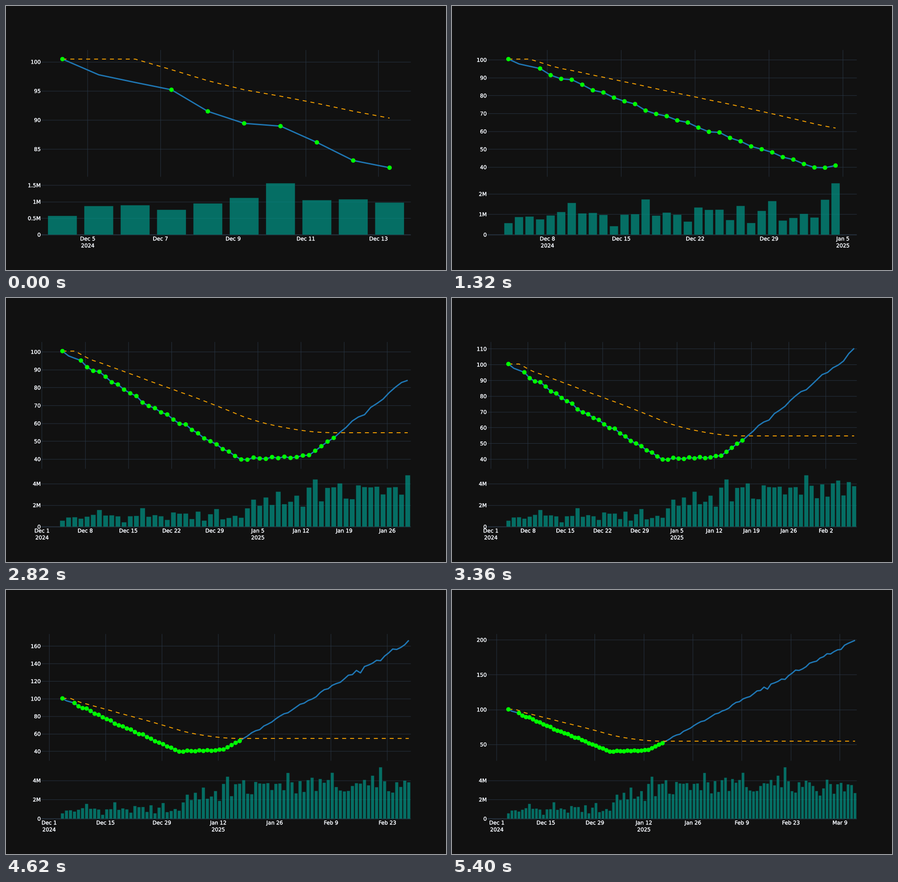
Recreate the animation shown at these times as a matplotlib script. Size 966x580 px, loop 5460 ms.

```python
import math

import numpy as np
import matplotlib.pyplot as plt
from matplotlib.animation import FuncAnimation
from matplotlib.collections import LineCollection, PolyCollection
from matplotlib.patheffects import withStroke

plt.rcParams["font.family"] = "DejaVu Sans"
plt.rcParams["text.hinting"] = "none"

# Three market phases: decline, sideways, growth
PHASE_DAYS = [30, 10, 60]
FIRST, DAYS = 10, sum(PHASE_DAYS)

# Layout on a 1000 x 600 drawing grid
LEFT, RIGHT, TOP, BOTTOM = 80, 920, 100, 520
PRICE_H = 0.686 * (BOTTOM - TOP)
VOL_H = 0.294 * (BOTTOM - TOP)
PRICE_BOTTOM = TOP + PRICE_H
DOT_SIZE = 10
DOT_PAD = DOT_SIZE / 1.6
X0 = LEFT + 0.05 * (RIGHT - LEFT) + DOT_PAD
X_LAST_DOT = RIGHT - (X0 - LEFT)
Y_PAD = 0.05 * PRICE_H

START_SHIFT = 3.303      # days from 1 December to the first data point
MONTHS = [("Dec", 31), ("Jan", 31), ("Feb", 28), ("Mar", 31)]

BG, GRID, INK = "#111111", "#283442", "#f2f5fa"
DPI = 100
PT = 0.966 * 72 / DPI    # points per drawing unit


def market():
    """Daily prices and volumes (in millions) with random noise."""
    noise = np.random.RandomState(42).standard_normal((2, DAYS))
    ends = [(100, 40), (40, 42), (42, 200)]
    trend = np.concatenate([np.linspace(a, b, n)
                            for (a, b), n in zip(ends, PHASE_DAYS)])
    mean = np.repeat([1.0, 2.5, 3.5], PHASE_DAYS)
    spread = np.repeat([0.3, 0.5, 0.7], PHASE_DAYS)
    return trend * (1 + 0.01 * noise[0]), mean + spread * noise[1]


def average_cost(prices):
    """Double first buy, then one more whenever price is 5% under cost."""
    spent, units = 2.0, 2.0 / prices[0]
    costs, buys = [prices[0]], [0]
    for day, p in enumerate(prices[1:], 1):
        if p <= 0.95 * spent / units:
            spent += 1
            units += 1 / p
            buys.append(day)
        costs.append(spent / units)
    return np.array(costs), np.array(buys)


PRICE, VOLUME = market()
COST, BUYS = average_cost(PRICE)


def nice_step(span, count):
    rough = span / count
    base = 10 ** math.floor(math.log10(rough))
    return base * next(m for m in (2, 5, 10) if m >= rough / base)


def day_step(span):
    return next(d for d in (1, 2, 3, 7, 14) if d >= span / 10)


def date_label(day):
    """Month-and-day text and year for a day counted from 1 December 2024."""
    year = 2024 if day < 31 else 2025
    for name, length in MONTHS:
        if day < length:
            return f"{name} {day + 1}", str(year)
        day -= length


def crisp(v):
    return math.floor(v) + 0.5


fig = plt.figure(figsize=(9.66, 5.80), dpi=DPI, facecolor=BG)
ax = fig.add_axes([0, 0, 1, 1])
ax.set_xlim(0, 1000)
ax.set_ylim(600, 0)
ax.axis("off")

grid = LineCollection([], colors=GRID, linewidths=PT, snap=False, zorder=1)
ax.add_collection(grid)
ax.plot([LEFT, RIGHT], [BOTTOM, BOTTOM], color=GRID, lw=2 * PT,
        solid_capstyle="butt", snap=False, zorder=1)
bars = PolyCollection([], facecolors="#009688", edgecolors=BG, alpha=0.7,
                      linewidths=0.5 * PT, snap=False, zorder=2)
ax.add_collection(bars)
price_line, = ax.plot([], [], color="#1f77b4", lw=3 * PT,
                      solid_capstyle="butt", zorder=3)
cost_line, = ax.plot([], [], color="#ffa500", lw=2 * PT,
                     linestyle=(0, (4.5, 4.5)), zorder=4)
# Polygons instead of markers, which would jump to whole pixels
dots = PolyCollection([], facecolors="#00ff00", linewidths=0, zorder=5)
ax.add_collection(dots)
turn = np.linspace(0, 2 * np.pi, 40, endpoint=False)
CIRCLE = DOT_SIZE / 2 * np.column_stack([np.cos(turn), np.sin(turn)])

labels = []
text_weight = [withStroke(linewidth=0.35 * PT, foreground=INK)]


def label(x, y, text, ha):
    labels.append(ax.text(x, y, text, ha=ha, va="baseline", color=INK,
                          fontsize=12 * PT, path_effects=text_weight,
                          zorder=6))


def y_ticks(lo, hi, count, to_y, fmt):
    """Label the ticks and return their grid lines."""
    step = nice_step(hi - lo, count)
    lines = []
    for i in range(math.ceil(lo / step), math.floor(hi / step) + 1):
        y = to_y(i * step)
        label(LEFT - 1, y + 4.2, fmt(i * step), "right")
        if i:
            lines.append([(LEFT, crisp(y)), (RIGHT, crisp(y))])
    return lines


def x_ticks(scale):
    step = day_step((RIGHT - LEFT) / scale)
    first = START_SHIFT - (X0 - LEFT) / scale
    last = first + (RIGHT - LEFT) / scale
    # Dates fall on multiples counted from Sunday 2 January 2000
    day = math.ceil((9100 + first) / step) * step - 9100
    lines, shown_year = [], None
    while day <= last:
        x = X0 + (day - START_SHIFT) * scale
        text, year = date_label(day)
        label(x, BOTTOM + 13, text, "center")
        if year != shown_year:
            label(x, BOTTOM + 28.6, year, "center")
            shown_year = year
        lines.append([(crisp(x), TOP), (crisp(x), PRICE_BOTTOM)])
        day += step
    return lines


def volume_text(v):
    return f"{v:g}M" if v else "0"


def draw(frame):
    n = FIRST + frame
    prices, volumes = PRICE[:n], VOLUME[:n]
    buys = BUYS[BUYS < n]
    while labels:
        labels.pop().remove()

    # Each axis fits its data plus the padding of lines, dots and bars
    x_scale = min((X_LAST_DOT - X0) / buys[-1], (RIGHT - X0) / (n - 0.5))
    low, high = prices.min(), prices.max()
    y_low = PRICE_BOTTOM - Y_PAD - DOT_PAD
    p_scale = min((y_low - TOP - Y_PAD - DOT_PAD) / (PRICE[0] - low),
                  (y_low - TOP - Y_PAD) / (high - low))
    v_scale = 0.95 * VOL_H / volumes.max()

    def price_y(p):
        return y_low - (p - low) * p_scale

    def volume_y(v):
        return BOTTOM - v * v_scale

    p_min = low - (Y_PAD + DOT_PAD) / p_scale
    lines = x_ticks(x_scale)
    lines += y_ticks(p_min, p_min + PRICE_H / p_scale, PRICE_H / 40 + 1,
                     price_y, lambda p: f"{p:.0f}")
    lines += y_ticks(0, VOL_H / v_scale, 5, volume_y, volume_text)
    grid.set_segments(lines)

    xs = X0 + np.arange(n) * x_scale
    half = 0.4 * x_scale
    bars.set_verts([[(x - half, BOTTOM), (x - half, y), (x + half, y),
                     (x + half, BOTTOM)]
                    for x, y in zip(xs, volume_y(volumes))])
    price_line.set_data(xs, price_y(prices))
    cost_line.set_data(xs, price_y(COST[:n]))
    centres = np.column_stack([xs[buys], price_y(PRICE[buys])])
    dots.set_verts([CIRCLE + c for c in centres])
    return []


anim = FuncAnimation(fig, draw, frames=DAYS - FIRST + 1, interval=60,
                     init_func=lambda: draw(0), repeat=True, repeat_delay=0,
                     blit=False)
plt.show()
```
